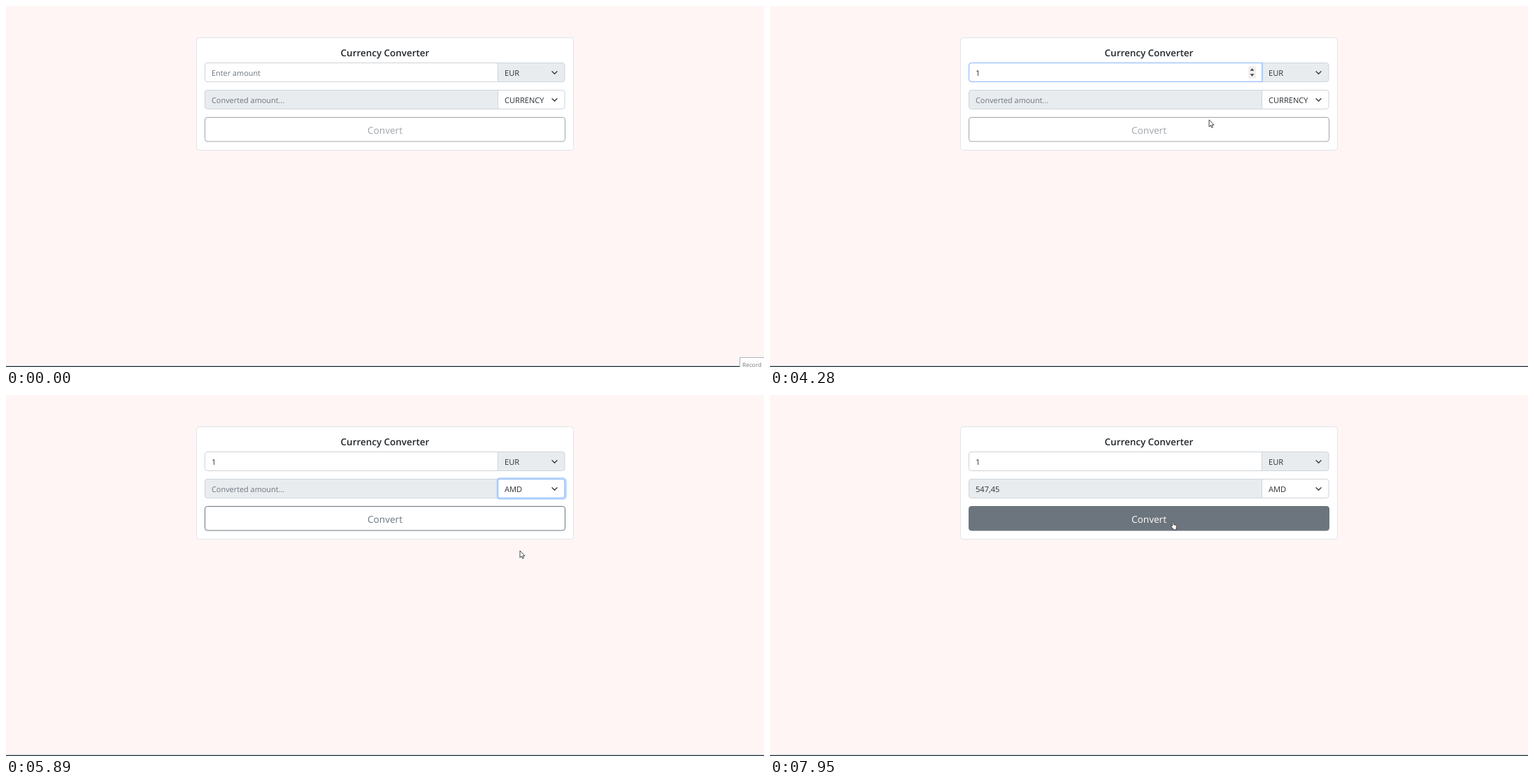
Write an HTML page that moves like this. It is 1084 px wide and 517 px high and loops after 8000 ms.

```html
<!DOCTYPE html>
<html lang="en">
<head>
<meta charset="utf-8">
<title>Currency Converter</title>
<style>
  html, body { margin: 0; width: 100%; height: 100%; overflow: hidden; background: #fff5f5; }
  svg { display: block; }
  text { font: 11.1px "Open Sans", sans-serif; fill: #2b3035; text-rendering: geometricPrecision; }
  .hint { font-size: 10.9px; fill: #6c757d; }
  .title { font-size: 13.45px; font-weight: 600; fill: #212529; }
  .label { font-size: 13.6px; }
  .box { fill: #fff; stroke: #ced4da; }
  .off { fill: #e9ecef; }
  .chevron { fill: none; stroke: #343a40; stroke-width: 1.4; stroke-linecap: round; stroke-linejoin: round; }
  #list { filter: drop-shadow(0 8px 11px rgba(0, 0, 0, .2)); }
  #cursor path { fill: #fff; stroke: #333; stroke-width: .9; stroke-linejoin: round; }
  #cursor #beam { fill: none; stroke: #333; stroke-width: 1; }
</style>
</head>
<body>
<svg width="1084" height="517" viewBox="0 0 1084 517">
  <rect y="515.7" width="1084" height="1.3" fill="#1b333d"/>
  <g id="tooltip">
    <rect x="1049.5" y="503.5" width="40" height="20" fill="#fff" stroke="#b5b5b5"/>
    <text x="1053" y="517" style="font-size:8.4px;fill:#777">Record</text>
  </g>

  <rect x="272.5" y="45.5" width="539" height="161" rx="4" fill="#fff" stroke="#e3e3e6"/>
  <text class="title" x="542" y="72" text-anchor="middle">Currency Converter</text>

  <path class="box" d="M704 81.5H288a3.5 3.5 0 0 0-3.5 3.5v20a3.5 3.5 0 0 0 3.5 3.5H704z"/>
  <path class="box off" d="M703.5 81.5H795.5a3.5 3.5 0 0 1 3.5 3.5v20a3.5 3.5 0 0 1-3.5 3.5H703.5z"/>
  <path class="box off" d="M704 120.5H288a3.5 3.5 0 0 0-3.5 3.5v20a3.5 3.5 0 0 0 3.5 3.5H704z"/>
  <path class="box" d="M703.5 120.5H795.5a3.5 3.5 0 0 1 3.5 3.5v20a3.5 3.5 0 0 1-3.5 3.5H703.5z"/>
  <path id="inputFocus" fill="none" stroke="#86b7fe"
        d="M704 81.5H288a3.5 3.5 0 0 0-3.5 3.5v20a3.5 3.5 0 0 0 3.5 3.5H704z"/>
  <g id="selectFocus" fill="none">
    <rect x="702.5" y="119.5" width="98" height="29" rx="4" stroke="#c2dbfe" stroke-width="3"/>
    <path stroke="#86b7fe" d="M703.5 120.5H795.5a3.5 3.5 0 0 1 3.5 3.5v20a3.5 3.5 0 0 1-3.5 3.5H703.5z"/>
  </g>

  <text id="amount" x="294" y="100"></text>
  <rect id="caret" y="87" width="1" height="16" fill="#222"/>
  <g id="spinner">
    <rect x="684" y="86" width="11" height="18" rx="2" fill="#efefef"/>
    <path d="M686.5 92.8l3-3.6 3 3.6zM686.5 97.2l3 3.6 3-3.6z" fill="#454545"/>
  </g>
  <text x="713" y="100">EUR</text>
  <path class="chevron" d="M781 93.7l3.5 3.5 3.5-3.5"/>
  <text id="result" x="294" y="139"></text>
  <text id="currency" x="713" y="139"></text>
  <path class="chevron" d="M781 132.7l3.5 3.5 3.5-3.5"/>

  <g id="button">
    <rect id="face" x="284.5" y="159.5" width="515" height="34.5" rx="3.5" fill="#6c757d" stroke="#6c757d"/>
    <text id="label" class="label" x="542" y="183" text-anchor="middle">Convert</text>
  </g>

  <g id="list">
    <path d="M705 148.5H799V469a4 4 0 0 1-4 4H709a4 4 0 0 1-4-4z" fill="#fff" stroke="#c4c4c4" stroke-width=".8"/>
    <rect x="787" y="149" width="11.6" height="321" fill="#f1f1f1"/>
    <rect x="787.8" y="160.5" width="10" height="36" fill="#c1c1c1"/>
    <path d="M790 156.5l2.8-3 2.8 3z" fill="#a3a3a3"/>
    <path d="M790 465.3l2.8 3 2.8-3z" fill="#333"/>
    <rect id="highlight" x="705" width="82" height="16.2" fill="#1e90ff"/>
  </g>

  <g id="cursor">
    <path id="arrow" d="M0 0V10L2.3 7.9L3.8 11.3L5.4 10.6L3.9 7.3H7Z"/>
    <path id="beam" d="M-2.5-4.5H-.8L0-4L.8-4.5H2.5M0-4V4M-2.5 4.5H-.8L0 4L.8 4.5H2.5"/>
    <path id="hand" d="M2.3 7V1.2a.9.9 0 0 1 1.8 0V4.6L8 5.4Q8.8 5.7 8.7 6.8L8 10V12H3.6V10.8L.6 7.5Q.4 6.2 1.4 6.2Z"/>
  </g>
</svg>
<script>
const LOOP = 8000, STEP = 66.7, ROW = 16.22, LIST_TOP = 148.8;
const codes = 'CURRENCY AED AFN ALL AMD ANG AOA ARS AUD AWG AZN BAM BBD BDT BGN BHD BIF BMD BND BOB'.split(' ');
const $ = id => document.getElementById(id);

// Moments of the interaction, in ms
const HOVER = 930, FOCUS = 2210, TYPED = 3600, SELECT = 4950, OPEN = 5010, PICK = 5890, PRESS = 6420, CLICK = 7160;

// Pointer path: time, x, y
const path = [
  [0, 1090, 530], [70, 1060, 512], [270, 950, 390], [600, 590, 180], [860, 423, 104],
  [920, 423, 104], [1190, 416, 98], [3670, 416, 98], [4060, 564, 165], [4269, 628, 163],
  [4600, 725, 158], [4870, 757.5, 149.5], [5270, 757.5, 149.5], [5530, 735, 223],
  [6140, 735, 223], [6400, 571, 178], [6470, 570.5, 177.5], [7580, 570.5, 177.5],
  [7670, 572, 178.5], [7900, 572, 178.5], [7930, 573, 181]
];

const items = codes.map((code, i) => {
  const item = document.createElementNS('http://www.w3.org/2000/svg', 'text');
  item.setAttribute('x', 714);
  item.setAttribute('y', 161 + i * ROW);
  item.textContent = code;
  return $('list').appendChild(item);
});

const snap = t => Math.floor((t + 5) / STEP) * STEP;
const show = (id, on) => $(id).style.display = on ? '' : 'none';

function fade(t, start) {
  if (t < start) return 0;
  const p = Math.min(1, (snap(t) - snap(start) + 44) / 120);
  return 1 - (1 - p) ** 2;
}

function pointer(t) {
  const next = path.findIndex(key => key[0] > t);
  if (next < 0) return path.at(-1).slice(1);
  const [t0, x0, y0] = path[next - 1], [t1, x1, y1] = path[next];
  const p = (t - t0) / (t1 - t0);
  return [x0 + (x1 - x0) * p, y0 + (y1 - y0) * p];
}

function render(t) {
  const [x, y] = pointer(snap(t));
  const focused = t >= FOCUS && t < SELECT, typed = t >= TYPED;
  const beam = t >= HOVER && y < 109, hand = t >= PICK && y < 195;

  show('tooltip', t < 130);
  show('spinner', focused || beam);
  $('inputFocus').style.opacity = fade(t, FOCUS) - fade(t, SELECT);
  $('selectFocus').style.opacity = fade(t, SELECT) - fade(t, CLICK);

  $('amount').textContent = typed ? '1' : 'Enter amount';
  $('amount').classList.toggle('hint', !typed);
  show('caret', focused && (t - (typed ? TYPED : FOCUS)) / 530 % 2 < 1);
  $('caret').setAttribute('x', typed ? 300 : 294);

  const done = t >= CLICK + 50;
  $('result').textContent = done ? '547,45' : 'Converted amount...';
  $('result').classList.toggle('hint', !done);
  $('currency').textContent = t < PICK ? codes[0] : 'AMD';

  const hover = fade(t, PRESS);
  $('button').style.opacity = t < PICK ? .65 : 1;
  $('face').style.fillOpacity = hover;
  $('label').style.fill = `color-mix(in srgb, #fff ${hover * 100}%, #6c757d)`;

  const row = Math.max(0, Math.floor((y - LIST_TOP) / ROW));
  show('list', t >= OPEN && t < PICK);
  $('highlight').setAttribute('y', LIST_TOP + row * ROW);
  items.forEach((item, i) => item.style.fill = i === row ? '#fff' : '');

  $('cursor').setAttribute('transform', `translate(${x} ${y})`);
  show('beam', beam);
  show('hand', hand);
  show('arrow', !beam && !hand);
}

function tick() {
  render(performance.now() % LOOP);
  requestAnimationFrame(tick);
}
tick();
</script>
</body>
</html>
```
